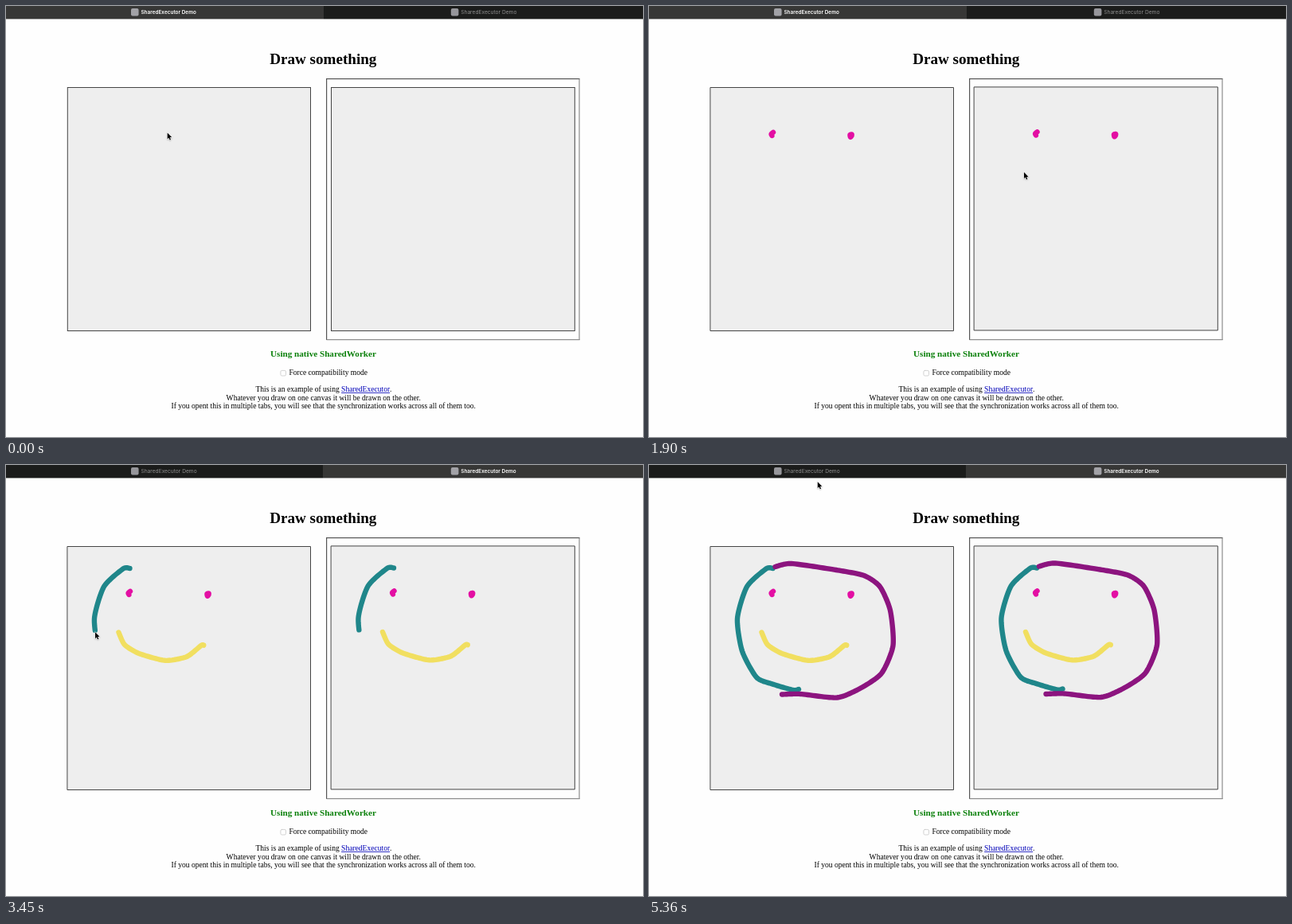
These frames come from a looping animation (800 px wide and 542 px high, 5410 ms). An HTML page with a canvas:

```html
<!DOCTYPE html>
<html lang="en">
<head>
<meta charset="utf-8">
<title>SharedExecutor Demo</title>
<style>
  html, body { margin: 0; width: 100%; height: 100%; overflow: hidden; background: #fff; }
  canvas { display: block; width: 800px; height: 542px; }
</style>
</head>
<body>
<canvas id="stage" width="800" height="542"></canvas>
<script>
const ctx = document.getElementById('stage').getContext('2d');
const LOOP = 5410, STEP = 50, LAST = 5360, TAB_SWITCH = 2750;
const SERIF = '"Liberation Serif", "Times New Roman", serif';
const SANS = 'Inter, sans-serif';
const MIRROR = { x: 331.5, y: -0.5 };
const PINK = '#e30fa3', YELLOW = '#f1df60', TEAL = '#1f868a', PURPLE = '#8c147f';

// Smooth curve through a few points, stored with its running length.
function curve(pts) {
  const path = [{ x: pts[0][0], y: pts[0][1], len: 0 }];
  const slope = (i, c) => 0.35 * ((pts[i + 1] || pts[i])[c] - (pts[i - 1] || pts[i])[c]);
  const hermite = (i, c, k) => {
    const a = pts[i][c], b = pts[i + 1][c], k2 = k * k, k3 = k2 * k;
    return a + (b - a) * (3 * k2 - 2 * k3)
      + slope(i, c) * (k3 - 2 * k2 + k) + slope(i + 1, c) * (k3 - k2);
  };
  for (let i = 0; i + 1 < pts.length; i++) {
    for (let n = 1; n <= 16; n++) {
      const x = hermite(i, 0, n / 16), y = hermite(i, 1, n / 16), last = path[path.length - 1];
      path.push({ x, y, len: last.len + Math.hypot(x - last.x, y - last.y) });
    }
  }
  return path;
}

const stroke = (start, end, color, side, pts) => ({ start, end, color, side, path: curve(pts) });
const rest = (start, end, x, y) => ({ start, end, side: 0, path: curve([[x, y]]) });

// What the pointer does, in order; it glides from each act to the next.
// side: 0 draws in the left panel, 1 in the right one.
const acts = [
  rest(0, 50, 202.9, 160),
  stroke(400, 900, PINK, 0, [[156, 158.8], [153.6, 161], [154.4, 163]]),
  stroke(1250, 1450, PINK, 0, [[254.7, 161.4], [252.5, 162], [253, 164.8], [254.4, 163.4]]),
  stroke(1945, 2350, YELLOW, 1, [[141.5, 210.5], [149, 226], [167, 237], [200, 245.8],
    [227, 241], [245, 227], [248.3, 226.7]]),
  rest(2600, 2800, 577, 17),
  stroke(3120, 3850, TEAL, 0, [[155.5, 130], [147, 130.5], [123, 153], [111, 193],
    [117, 234], [135, 267], [155, 275.5], [181, 283], [188, 282]]),
  stroke(4233, 4947, PURPLE, 1, [[158.5, 128], [179, 124], [235, 132], [270, 139], [290, 153],
    [303, 183], [306.5, 227], [292, 262], [265, 281], [236, 292.5], [190, 288], [167, 288.5]]),
  rest(LAST, LOOP, 212, 21.8)
];

const mix = (a, b, k) => a + (b - a) * k;
const clamp = k => Math.max(0, Math.min(1, k));
const easeOut = k => 1 - (1 - k) ** 2;

// Number of path points already passed; the pen moves at an even speed.
function reached({ start, end, path }, t) {
  const len = path[path.length - 1].len * clamp((t - start) / (end - start));
  const ahead = path.findIndex(p => p.len > len);
  return ahead < 0 ? path.length : ahead;
}

function penAt(act, t) {
  const p = act.path[reached(act, t) - 1];
  return [p.x + act.side * MIRROR.x, p.y + act.side * MIRROR.y];
}

function pointerAt(t) {
  const i = acts.findLastIndex(a => t >= a.start), act = acts[i], next = acts[i + 1];
  const from = penAt(act, t + 12);
  if (t <= act.end || !next) return from;
  const k = easeOut((t - act.end) / (next.start - act.end));
  return penAt(next, next.start).map((v, c) => mix(from[c], v, k));
}

function text(str, x, y, font, color, align = 'left') {
  ctx.font = font;
  ctx.fillStyle = color;
  ctx.textAlign = align;
  ctx.fillText(str, x, y);
}

function rect(x, y, w, h, color) {
  ctx.fillStyle = color;
  ctx.fillRect(x, y, w, h);
}

function roundBox(x, y, size, radius) {
  ctx.beginPath();
  ctx.roundRect(x, y, size, size, radius);
}

function drawTab(x, w, iconX, active) {
  rect(x, 0, w, 16.4, active ? '#373736' : '#1b1c1b');
  ctx.fillStyle = active ? '#a2a2a7' : '#96969b';
  roundBox(iconX, 3, 9.6, 2);
  ctx.fill();
  text('SharedExecutor Demo', iconX + 12.4, 10.3,
    active ? `600 6.45px ${SANS}` : `400 6.65px ${SANS}`, active ? '#fff' : '#8d8d8d');
}

function drawHeader(t) {
  const right = t >= TAB_SWITCH, split = right ? 398 : 399;
  drawTab(0, split, 157, !right);
  drawTab(split, 800 - split, 558.8, right);
}

function drawPanel(x, y, w) {
  rect(x, y, w, 306, '#eee');
  ctx.strokeStyle = '#444';
  ctx.lineWidth = 1;
  ctx.strokeRect(x, y, w, 306);
}

function drawPanels(t) {
  rect(402, 91, 318.5, 1.2, '#555');
  rect(402, 91, 1.2, 329, '#555');
  rect(719.4, 91.6, 1.2, 328.4, '#8c8c8c');
  rect(402.6, 419, 318, 1.2, '#8c8c8c');
  drawPanel(77.3, 102.5, 305.2);
  drawPanel(408.5, t < 300 ? 102.5 : 101.9, 305.8);
}

function drawTexts() {
  const body = `9.55px ${SERIF}`, mid = 398.7, blue = '#0000b8';
  text('Draw something', mid - 0.4, 73, `bold 19.1px ${SERIF}`, '#000', 'center');
  text('Using native SharedWorker', mid - 0.2, 441.4, `bold 11.15px ${SERIF}`, '#0b800b', 'center');

  ctx.strokeStyle = '#c8c8c8';
  ctx.lineWidth = 0.8;
  roundBox(344.9, 458.4, 6.6, 1.6);
  ctx.stroke();
  text('Force compatibility mode', 355.4, 464, body, '#000');

  const lead = 'This is an example of using ', link = 'SharedExecutor';
  const leadW = ctx.measureText(lead).width, linkW = ctx.measureText(link).width;
  const x = mid - ctx.measureText(lead + link + '.').width / 2;
  text(lead, x, 485, body, '#000');
  text(link, x + leadW, 485, body, blue);
  rect(x + leadW, 486, linkW, 0.8, blue);
  text('.', x + leadW + linkW, 485, body, '#000');
  text('Whatever you draw on one canvas it will be drawn on the other.', mid, 495.7, body, '#000', 'center');
  text('If you opent this in multiple tabs, you will see that the synchronization works across all of them too.',
    mid, 506.4, body, '#000', 'center');
}

function drawStroke(act, t) {
  if (!act.color || t < act.start) return;
  const done = act.path.slice(0, reached(act, t));
  ctx.strokeStyle = act.color;
  ctx.lineWidth = 6.4;
  ctx.lineCap = ctx.lineJoin = 'round';
  for (const side of [0, 1]) {
    ctx.save();
    ctx.translate(side * MIRROR.x, side * MIRROR.y);
    ctx.beginPath();
    ctx.moveTo(done[0].x, done[0].y);
    done.forEach(p => ctx.lineTo(p.x, p.y));
    ctx.stroke();
    ctx.restore();
  }
}

function drawPointer(x, y) {
  ctx.save();
  ctx.translate(x - 0.2, y - 0.6);
  ctx.scale(0.88, 0.88);
  const shape = new Path2D('M0 0V9L2 7.2L3.4 10.4L4.9 9.7L3.5 6.7L6.2 6.4Z');
  ctx.lineJoin = 'miter';
  ctx.strokeStyle = 'rgba(255,255,255,0.85)';
  ctx.lineWidth = 1.2;
  ctx.shadowColor = 'rgba(0,0,0,0.3)';
  ctx.shadowBlur = 1.5;
  ctx.shadowOffsetY = 0.7;
  ctx.stroke(shape);
  ctx.shadowColor = 'transparent';
  ctx.fillStyle = '#000';
  ctx.fill(shape);
  ctx.restore();
}

function draw(t) {
  rect(0, 0, 800, 542, '#fefefe');
  drawHeader(t);
  drawPanels(t);
  drawTexts();
  acts.forEach(act => drawStroke(act, t));
  drawPointer(...pointerAt(t));
}

function tick() {
  const t = performance.now() % LOOP;
  draw(t >= LAST ? LAST : Math.min(Math.floor(t / STEP) * STEP, LAST - 60));
  requestAnimationFrame(tick);
}
tick();
</script>
</body>
</html>
```
